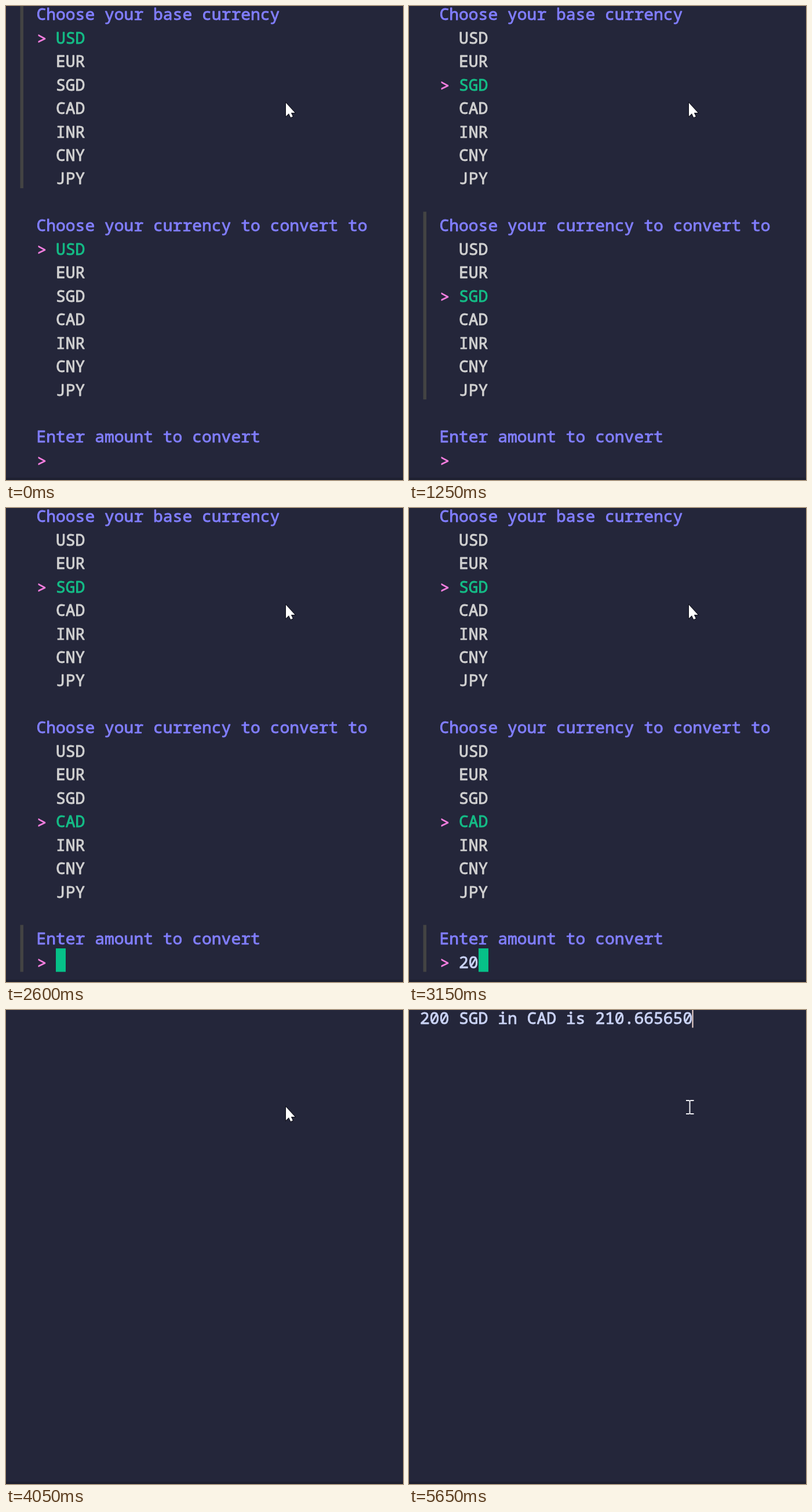
An HTML page with a canvas for the animation above (5.7 s loop, 685 by 817 pixels).

```html
<!DOCTYPE html>
<html lang="en">
<head>
<meta charset="utf-8">
<title>Currency converter</title>
<style>
  html, body { margin: 0; width: 100%; height: 100%; overflow: hidden; background: #24263a; }
  canvas { display: block; }
</style>
</head>
<body>
<canvas id="stage" width="685" height="817"></canvas>
<script>
const ctx = document.getElementById('stage').getContext('2d');
const LOOP = 5700;
const LEFT = 18.8, TOP = -9.5, CELL = 16.8, ROW = 40.45;
const BASELINE = 33.8;
const COLOR = {
  back: '#24263a', edge: '#1e2031', title: '#817eff', pink: '#f57fe0', green: '#14bc86',
  block: '#06c088', option: '#d0d0d0', bar: '#434343', text: '#cad3f5', white: '#fffdf5'
};
const CURRENCIES = ['USD', 'EUR', 'SGD', 'CAD', 'INR', 'CNY', 'JPY'];

// Start times of each state, in ms.
const BASE_MOVES = [200, 400];
const TARGET_MOVES = [950, 1250, 1500];
const KEYS = [2950, 3150, 3350];
const FOCUS_MOVES = [650, 2200];
const CLEARED = 4000, CONVERTING = 4550, DONE = 5300;

// Empty dot of the spinner as [column, row], one per step.
const GAPS = [[0, 0], [0, 1], [0, 2], [0, 3], [1, 3], [1, 2], [1, 1], [1, 0]];

const passed = (times, t) => times.filter(start => t >= start).length;
const cellX = col => LEFT + col * CELL;
const rowY = row => TOP + row * ROW;

// A thin outline gives the regular face a medium weight.
function write(text, col, row, color) {
  const x = cellX(col), y = rowY(row) + BASELINE;
  ctx.font = '28px "Noto Sans Mono", monospace';
  ctx.lineJoin = 'round';
  ctx.lineWidth = 0.9;
  ctx.fillStyle = ctx.strokeStyle = color;
  ctx.fillText(text, x, y);
  ctx.strokeText(text, x, y);
}

function fill(color, x, y, w, h) {
  ctx.fillStyle = color;
  ctx.fillRect(x, y, w, h);
}

function prompt(row) {
  write('>', 2.06, row + 0.04, COLOR.pink);
}

function focusBar(row, rows) {
  fill(COLOR.bar, 24.5, rowY(row), 5.5, rows * ROW);
}

function menu(title, row, selected) {
  write(title, 2, row, COLOR.title);
  CURRENCIES.forEach((code, i) => {
    const active = i === selected;
    if (active) prompt(row + 1 + i);
    write(code, 4, row + 1 + i, active ? COLOR.green : COLOR.option);
  });
}

function form(t) {
  const focus = passed(FOCUS_MOVES, t);
  focusBar(focus * 9, focus < 2 ? 8 : 2);
  menu('Choose your base currency', 0, passed(BASE_MOVES, t));
  menu('Choose your currency to convert to', 9, passed(TARGET_MOVES, t));
  write('Enter amount to convert', 2, 18, COLOR.title);
  prompt(19);
  const typed = '200'.slice(0, passed(KEYS, t));
  write(typed, 4, 19, COLOR.text);
  if (focus === 2) fill(COLOR.block, Math.round(cellX(4 + typed.length)), rowY(19), 17, ROW);
}

function spinner(t) {
  const [gapCol, gapRow] = GAPS[(1 + Math.floor((t - CONVERTING) / 100)) % GAPS.length];
  ctx.fillStyle = COLOR.pink;
  for (let col = 0; col < 2; col++) {
    for (let row = 0; row < 4; row++) {
      if (col === gapCol && row === gapRow) continue;
      ctx.beginPath();
      ctx.arc(26.5 + col * 8.6, 3 + row * 8.4, 3.6, 0, Math.PI * 2);
      ctx.fill();
    }
  }
}

function arrowPointer() {
  const arrow = new Path2D('M483 167V190L488 185.3L491.2 192L494.8 190.4L491.8 184H498.5Z');
  ctx.lineJoin = 'miter';
  ctx.strokeStyle = '#11121c';
  ctx.lineWidth = 2;
  ctx.stroke(arrow);
  ctx.fillStyle = '#fff';
  ctx.fill(arrow);
}

function textPointer() {
  ctx.strokeStyle = '#eeeef2';
  ctx.lineWidth = 2;
  ctx.stroke(new Path2D('M478 156H483L484.5 157L486 156H491.5M484.5 157V178M478 179H483L484.5 178L486 179H491.5'));
}

function draw(t) {
  fill(COLOR.back, 0, 0, 685, 817);
  fill(COLOR.edge, 0, 813, 685, 4);
  if (t < CLEARED) {
    form(t);
  } else if (t >= DONE) {
    write('200 SGD in CAD is 210.665650', 0, 0, COLOR.text);
    fill('#f4dbd6', 488.5, 0, 2, 30.5);
  } else if (t >= CONVERTING) {
    spinner(t);
    write('Converting...', 2, 0, COLOR.white);
  }
  if (t < DONE) arrowPointer();
  else textPointer();
}

const begin = performance.now();
function tick() {
  draw((performance.now() - begin) % LOOP);
  requestAnimationFrame(tick);
}
tick();
</script>
</body>
</html>
```
